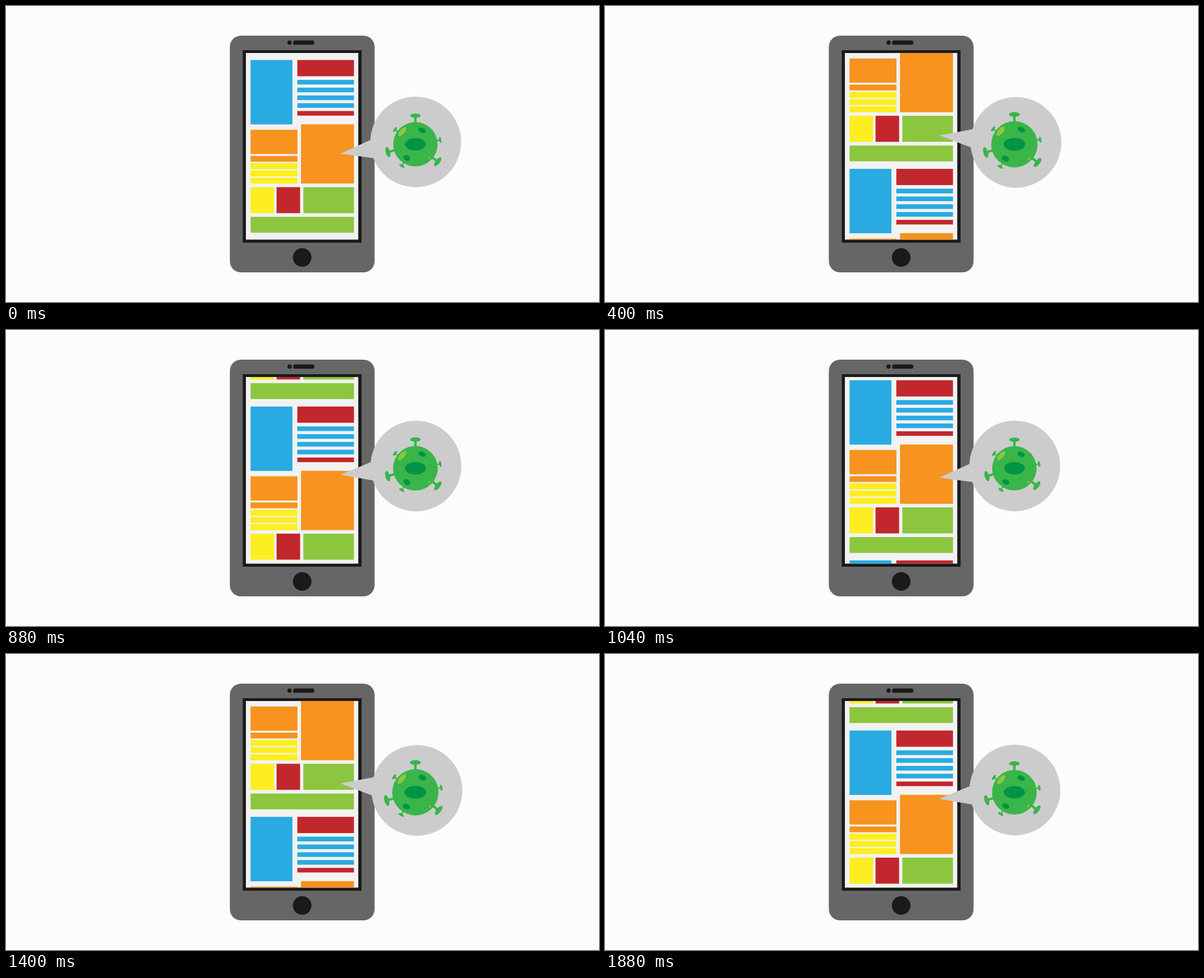
Recreate the animation shown at these times as an HTML page. Size 1058 by 529 pixels, loop 1920 ms.

```html
<!DOCTYPE html>
<html lang="en">
<head>
<meta charset="utf-8">
<title>Phone feed</title>
<style>
html, body { margin: 0; width: 100%; height: 100%; overflow: hidden; background: #fcfcfc; }
svg { display: block; width: 100%; height: 100%; }
</style>
</head>
<body>
<svg viewBox="0 0 1058 529">
  <defs>
    <clipPath id="screen"><rect x="428" y="84" width="200.5" height="333.5"/></clipPath>
    <g id="page"></g>
  </defs>

  <rect x="399.4" y="53" width="258.2" height="423" rx="20" fill="#666"/>
  <g fill="#1a1a1a">
    <rect x="422.4" y="79" width="212" height="344"/>
    <circle cx="528.4" cy="449.4" r="16.6"/>
    <circle cx="506" cy="65.4" r="3.8"/>
    <rect x="512.2" y="61.5" width="38" height="7.8" rx="3.9"/>
  </g>
  <rect x="428" y="84" width="200.5" height="333.5" fill="#f2f2f2"/>
  <g clip-path="url(#screen)">
    <g id="feed">
      <use href="#page"/>
      <use href="#page" y="322"/>
    </g>
  </g>

  <g fill="#ccc">
    <circle id="bubble" r="81"/>
    <path id="tail"/>
  </g>

  <g id="virus">
    <g id="spikes" fill="#39b54a" stroke="#39b54a"></g>
    <circle r="39.6" fill="#39b54a"/>
    <g fill="#009444">
      <ellipse rx="18.5" ry="11"/>
      <ellipse rx="7" ry="4.3" transform="translate(12 -25) rotate(25)"/>
      <ellipse rx="6.5" ry="4.7" transform="translate(-15.4 24.5) rotate(25)"/>
    </g>
    <g fill="#8cc63f">
      <ellipse rx="10" ry="4.4" transform="translate(-23.3 -22.5) rotate(-48)"/>
      <ellipse rx="2.6" ry="1.4" transform="translate(24.7 24.5) rotate(-40)"/>
    </g>
  </g>
</svg>
<script>
const $ = id => document.getElementById(id);
const LOOP = 1920, STEP = 40, PAGE = 322;
const blue = '#29abe2', red = '#c1272d', orange = '#f7931e', yellow = '#fcee21', green = '#8cc63f';

// left, top, right, bottom
const blocks = [
  [blue, 436.3, 96.5, 511, 211.6],
  [red, 519.8, 96.5, 620.8, 125.5],
  [red, 519.8, 187.7, 620.8, 195.9],
  [orange, 526.3, 211.4, 620.8, 317.3],
  [orange, 436.3, 221.2, 520, 264.5],
  [orange, 436.3, 268, 520, 278.3],
  [yellow, 436.3, 323.7, 478.3, 370.2],
  [red, 482.7, 323.7, 524.7, 370.2],
  [green, 530.5, 323.7, 620.8, 370.2],
  [green, 436.3, 376.8, 620.8, 405.1]
];
for (let i = 0; i < 4; i++) blocks.push([blue, 519.8, 132 + 13.9 * i, 620.8, 140.3 + 13.9 * i]);
for (let i = 0; i < 3; i++) blocks.push([yellow, 436.3, 281 + 12.9 * i, 520, 291.6 + 12.9 * i]);

$('page').innerHTML = blocks.map(([fill, l, t, r, b]) =>
  `<rect x="${l}" y="${t}" width="${r - l}" height="${b - t}" fill="${fill}"/>`).join('');

// angle, distance of the cap, cap radii, stalk width
const spikes = [
  [0, 51, 9.4, 3.9, 4.2],
  [128, 50.6, 9.4, 3.9, 4.2],
  [254, 51, 9.4, 3.9, 4.2],
  [80, 44.8, 5.2, 2.1, 2.4],
  [212, 45.6, 5.2, 2.1, 2.4],
  [306, 44.8, 5.2, 2.1, 2.4]
];
$('spikes').innerHTML = spikes.map(([angle, d, rx, ry, w]) =>
  `<g transform="rotate(${angle})"><path d="M0 -34V${-d}" stroke-width="${w}"/>` +
  `<ellipse cy="${-d}" rx="${rx}" ry="${ry}" stroke="none"/></g>`).join('');

function draw(ms) {
  const tick = Math.floor((ms % LOOP) / STEP + 1e-3);
  // The one-second cycle has 48 poses, shown at 25 per second.
  const phase = Math.floor((tick % 25) * 1.92 + 1e-6) / 48;
  const swing = (1 - Math.cos(phase * 2 * Math.PI)) / 2;

  $('feed').setAttribute('transform', `translate(0 ${-PAGE * phase})`);
  $('bubble').setAttribute('transform', `translate(${731 + 2.4 * swing} ${242.9 + 0.9 * swing})`);
  $('tail').setAttribute('d',
    `M596.6 ${264 - 36.4 * swing}L668 ${231.2 - 14.6 * swing}V${273.6 - 16.8 * swing}Z`);
  $('virus').setAttribute('transform', `translate(730.4 247.1) scale(${1 + 0.048 * swing})`);
}

function run() {
  draw(performance.now());
  requestAnimationFrame(run);
}
run();
</script>
</body>
</html>
```
